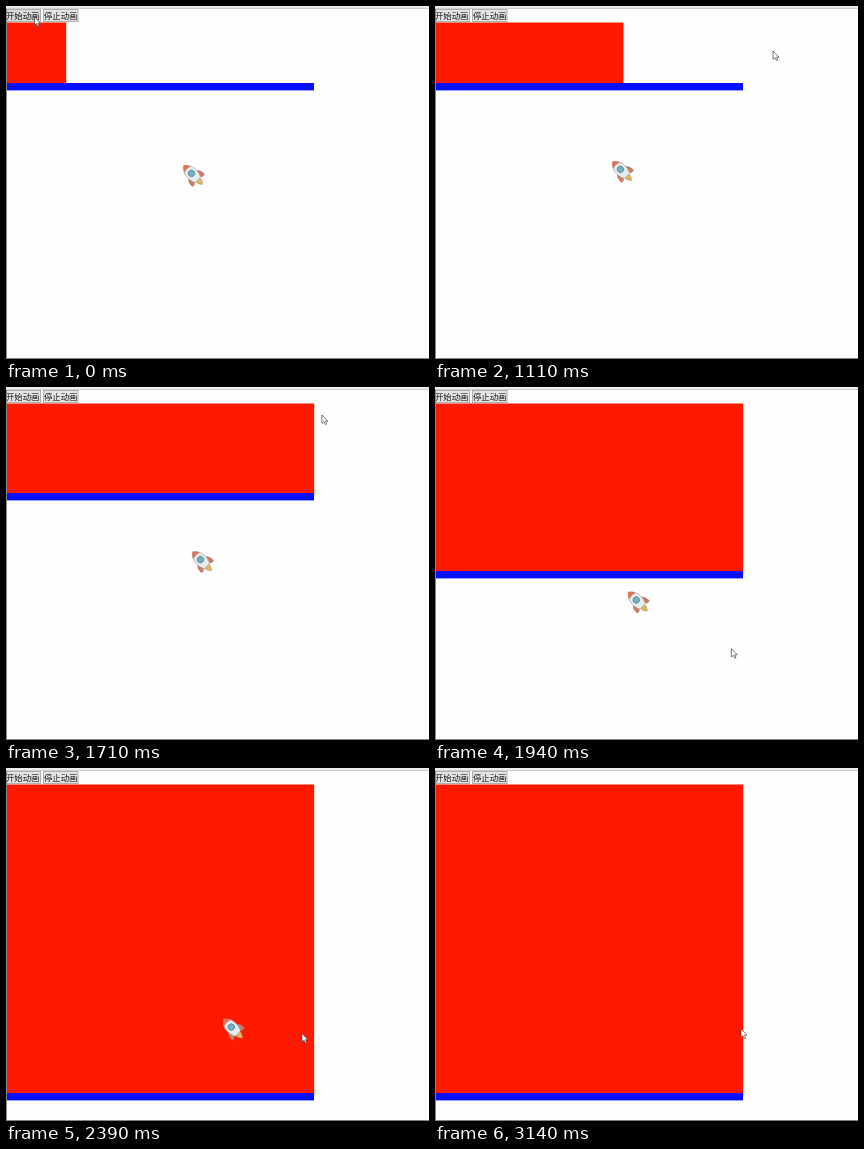
An HTML page with a canvas for the animation above (3700 ms loop, 423x353 px).

```html
<!DOCTYPE html>
<html lang="zh">
<head>
<meta charset="utf-8">
<style>
  html, body { margin: 0; width: 100%; height: 100%; overflow: hidden; background: #fefefe; }
  canvas { display: block; width: 423px; height: 353px; }
</style>
</head>
<body>
<canvas id="stage" width="423" height="353"></canvas>
<script>
const ctx = document.getElementById('stage').getContext('2d');
const LOOP = 3700, CLICK = 560, RESUME = 1110, TURN = 1710, EXIT = 2700;

const span = (t, from, to) => Math.min(1, Math.max(0, (t - from) / (to - from)));
const mix = (a, b, p) => a + (b - a) * p;
const smooth = p => p * p * (3 - 2 * p);

// A short burst after the click, then a pause until RESUME.
const burst = t => t < CLICK ? 0 : span(t, 540, 610);

function rectRight(t) {
  if (t < RESUME) return mix(60, 168, burst(t));
  return mix(188, 308, span(t, RESUME, 1625));
}

function barBottom(t) {
  const p = span(t, 1613, 2275);
  return Math.round(mix(84, 332, p * (0.75 + 0.25 * p)));
}

function rocketAt(t) {
  if (t < RESUME) return [187, mix(169, 166, burst(t))];
  if (t < TURN) {
    const p = span(t, RESUME, TURN);
    return [mix(187, 196, p * p), mix(165, 174, p) - 60 * p * (1 - p)];
  }
  if (t < EXIT) {
    return [
      mix(196, 232, span(t, TURN, 2470) ** 1.4),
      mix(262, 174, (1 - span(t, TURN, 2450)) ** 1.65)
    ];
  }
  const p = span(t, EXIT, 3140);
  return [mix(232, 371, p ** 1.5), mix(262, 366, p * p)];
}

function cursorAt(t) {
  if (t < RESUME) return [mix(28.5, 289, burst(t)), mix(11, 40, burst(t))];
  if (t < TURN) {
    const p = span(t, RESUME, TURN);
    return [mix(338, 316, p ** 4) + 24 * p * (1 - p), mix(45, 28, p)];
  }
  const down = smooth(span(t, TURN, 1960)), aside = smooth(span(t, 2520, 2670));
  return [mix(316, 296, down) + 10 * aside, mix(28, 265.5, down) - 4.5 * aside];
}

function box(x, y, w, h, color) {
  ctx.fillStyle = color;
  ctx.fillRect(x, y, w, h);
}

function shape(path, fill, stroke, line = 0.6) {
  const p = new Path2D(path);
  ctx.fillStyle = fill;
  ctx.fill(p);
  if (stroke) {
    ctx.strokeStyle = stroke;
    ctx.lineWidth = line;
    ctx.stroke(p);
  }
}

function button(x, w, label, textX, hot) {
  box(x, 3, w, 13, '#b0b0b0');
  box(x + 1, 4, w - 2, 11, hot ? '#dadada' : '#e4e4e4');
  ctx.fillStyle = '#181818';
  ctx.font = '8.4px "Noto Sans CJK SC", "Noto Sans CJK", sans-serif';
  ctx.fillText(label, textX, 13);
}

function rocket([x, y]) {
  ctx.save();
  ctx.translate(x, y);
  ctx.rotate(-Math.PI / 4);
  shape('M-2.8 6Q-3.4 10 0 13.4Q3.4 10 2.8 6Z', '#e2b766', '#b8935c');
  for (const side of [-1, 1]) {
    ctx.save();
    ctx.scale(side, 1);
    shape('M4 -0.5L6.4 0.2Q8.8 2.5 8.6 7.6L6.2 8L3.4 5.5Z', '#d27b62', '#a4786c');
    ctx.restore();
  }
  shape('M0 -13.3C7.4 -8 6.8 1 3.8 7L-3.8 7C-6.8 1 -7.4 -8 0 -13.3Z', '#e6ecec', '#98a2a4');
  shape('M0 -13.4Q3.4 -11 4.6 -7.8Q0 -9.4 -4.6 -7.8Q-3.4 -11 0 -13.4Z', '#da7458');
  shape('M-3.2 -2.2A3.2 3.2 0 1 1 3.2 -2.2A3.2 3.2 0 1 1 -3.2 -2.2Z', '#72b0c2', '#5c8494', 0.9);
  ctx.restore();
}

function cursor([x, y]) {
  ctx.save();
  ctx.translate(x, y);
  shape('M0 0V8.4L2 6.7L3.4 9.6L4.7 9L3.4 6.2H6Z', '#fff', '#444', 0.7);
  ctx.restore();
}

function draw(t) {
  const bottom = barBottom(t);
  box(0, 0, 423, 353, '#fefefe');
  box(0, 0, 423, 2, '#ececec');
  box(0, 2, 423, 1, '#cfcfcf');
  button(0, 35, '开始动画', 0, t < CLICK);
  button(37, 35.5, '停止动画', 38, false);
  box(1, 16.5, rectRight(t) - 0.8, bottom - 20, '#ff1900');
  box(1, bottom - 6, 307, 6.4, '#0610ff');
  box(1, bottom - 7, 307, 1.2, '#1a0ef0');
  rocket(rocketAt(t));
  box(0, 3, 1, 350, '#858585');
  box(0, 352, 423, 1, '#858585');
  cursor(cursorAt(t));
}

const start = performance.now();
function tick() {
  draw((performance.now() - start) % LOOP);
  requestAnimationFrame(tick);
}
tick();
</script>
</body>
</html>
```
